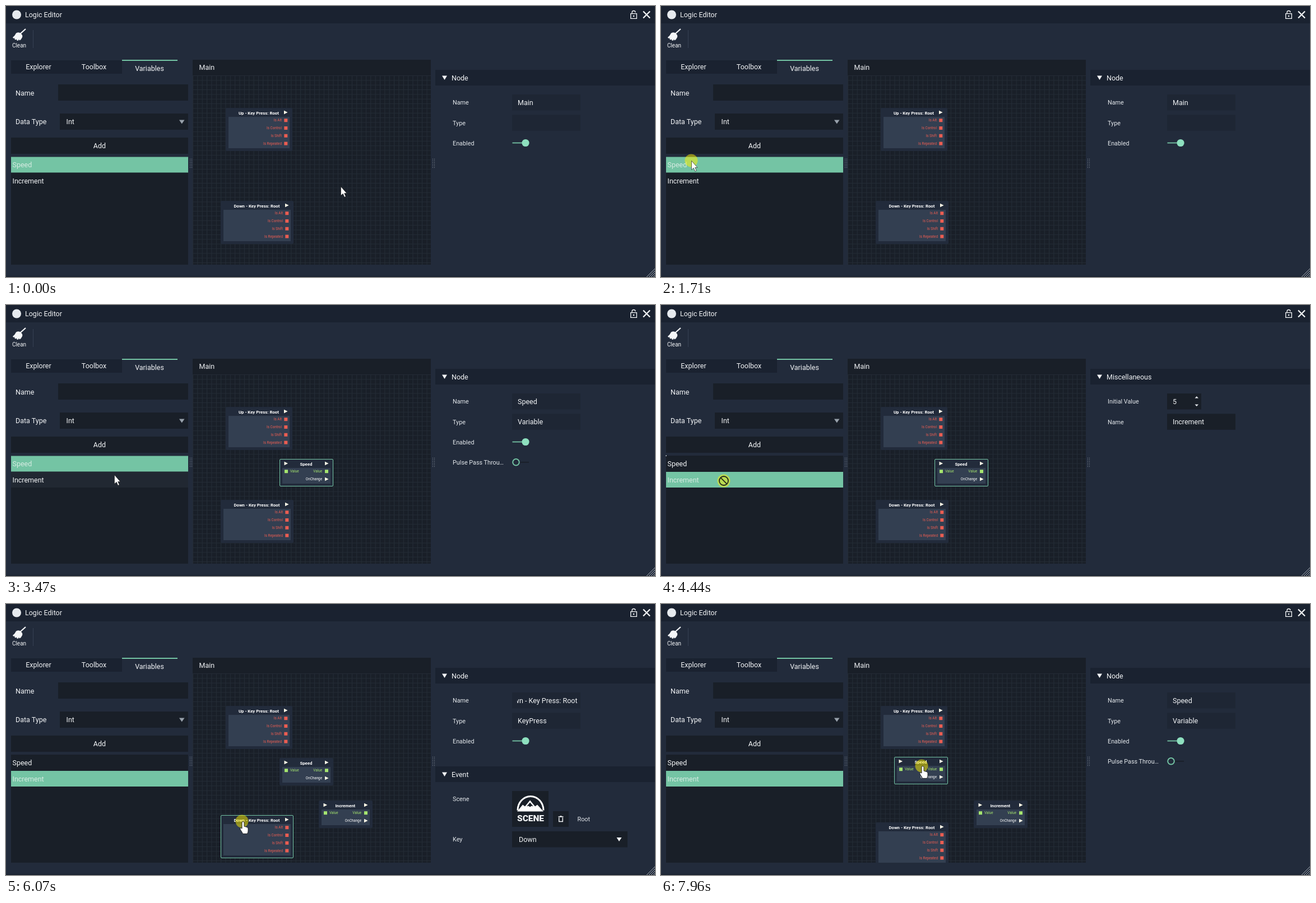
An HTML page that plays this animation: 1158 by 484 pixels, repeating every 8 s.

```html
<!DOCTYPE html>
<html lang="en">
<head>
<meta charset="utf-8">
<title>Logic Editor</title>
<style>
  html, body { margin: 0; width: 100%; height: 100%; overflow: hidden; background: #222b3b; }
  svg { display: block; width: 100vw; height: 100vh; }
  text { font: 12.5px Roboto, sans-serif; fill: #f2f4f6; white-space: pre; }
  .mid { text-anchor: middle; }
  .end { text-anchor: end; }
  .label { font-size: 10.8px; fill: #e4e8ec; }
  .small { font-size: 10px; }
  .title { font-size: 7.8px; font-weight: 700; text-anchor: middle; fill: #fff; }
  .pin { font-size: 6.3px; }
  .bar { fill: #1a2230; }
  .well { fill: #191f28; }
  .dim { fill: #1e2634; }
  .frame { fill: #222b3b; stroke: #222b3b; }
  .body { fill: #333f51; }
  .hover .frame { fill: #2a3549; stroke: #2a3549; }
  .hover .body { fill: #43506a; }
  .selected .frame { stroke: #74c4a4; }
  .row { fill: none; }
  .row.over { fill: #212832; }
  .row.on { fill: #74c4a4; }
  .row.on + text { fill: #d6ebe2; }
  .off { display: none; }
</style>
</head>
<body>
<svg viewBox="0 0 1158 484" preserveAspectRatio="none">
  <defs>
    <pattern id="grid" x="333" y="124" width="8.35" height="8.35" patternUnits="userSpaceOnUse">
      <path d="M0 .5H8.35M.5 0V8.35" stroke="#242c36" fill="none"/>
    </pattern>
    <clipPath id="canvasClip"><rect x="333" y="124" width="425" height="338"/></clipPath>
    <clipPath id="nameClip"><rect x="912" y="158" width="110" height="28"/></clipPath>
  </defs>
  <rect width="1158" height="484" fill="#222b3b"/>

  <!-- title bar and toolbar -->
  <rect class="bar" width="1158" height="31"/>
  <rect class="bar" y="482" width="1158" height="2"/>
  <circle cx="19" cy="15.5" r="8" fill="#e6eaee"/>
  <text x="34" y="20">Logic Editor</text>
  <g fill="none" stroke="#f4f6f8">
    <path d="M1114.7 13.7h10.600v8.600h-10.600zM1117 13.500v-2a3 3 0 0 1 6 0" stroke-width="1.3"/>
    <circle cx="1120" cy="18" r="1.3" fill="#f4f6f8" stroke="none"/>
    <path d="M1137 9.500l12 12m0-12l-12 12" stroke-width="2.2"/>
    <path d="M48.5 43v32" stroke="#364152"/>
    <path d="M35 41l-9.500 8.500" stroke-width="2.2"/>
  </g>
  <path d="M18 48.500q5-3 9 1t1 8q-1 3-4 4l-1-2-1.500 2.500-2.500-.8.5-2-2.500 1.300-2-1.800 1-1.500-2.800.5-1.200-1.700q4-3 6-7.500z" fill="#f4f6f8"/>
  <text class="small mid" x="23.5" y="73.5">Clean</text>

  <!-- variables panel -->
  <rect class="bar" x="9" y="97" width="198" height="24"/>
  <rect x="207" y="96" width="99" height="2" fill="#74c4a4"/>
  <text class="mid" x="58" y="113">Explorer</text>
  <text class="mid" x="157" y="113">Toolbox</text>
  <text class="mid" x="256" y="116">Variables</text>
  <text x="17" y="160">Name</text>
  <text x="17" y="211">Data Type</text>
  <rect class="well" x="93" y="140" width="232" height="29"/>
  <rect class="well" x="96" y="192" width="229" height="29"/>
  <text x="107.5" y="211">Int</text>
  <path d="M309 203.500h9.500l-4.750 7z" fill="#98a1ab"/>
  <rect class="well" x="9" y="235" width="316" height="29"/>
  <text class="mid" x="167" y="254">Add</text>
  <rect class="well" x="9" y="269" width="316" height="193"/>
  <rect class="row" id="rowSpeed" x="9" y="269.5" width="316" height="28"/>
  <text x="11.5" y="288">Speed</text>
  <rect class="row" id="rowIncrement" x="9" y="298" width="316" height="28"/>
  <text x="11.5" y="317">Increment</text>
  <rect id="dot" x="8.5" y="268.5" width="1.5" height="1.5" fill="#e8ecf0"/>
  <path d="M328.500 273v16M331.500 273v16M761.500 273v16M764.500 273v16" stroke="#8d95a1" stroke-dasharray="1 2"/>

  <!-- canvas -->
  <rect class="well" x="333" y="96" width="425" height="366"/>
  <rect x="333" y="124" width="425" height="338" fill="url(#grid)"/>
  <text x="344.5" y="114">Main</text>
  <g id="nodes" clip-path="url(#canvasClip)"></g>

  <g id="panels"></g>
  <path d="M1143 484l15-15M1147 484l11-11M1151 484l7-7M1155 484l3-3" stroke="#a9b0b9"/>

  <g id="pointer">
    <circle id="press" r="11.5" fill="#fff200" fill-opacity=".5"/>
    <path id="arrow" d="M.5 .5V16.500L4.200 13.300l2.600 6 2.500-1-2.600-5.800H11z" fill="#fff" stroke="#111" stroke-width=".6"/>
    <path id="hand" transform="translate(2 .5) scale(1 1.15)" d="M-2 2a2 2 0 0 1 4 0v5.500l5 1.300q2 .4 2 2.300v3.400q0 2-1.500 4.500h-8q-1-2.500-4-6q-1.500-2 0-3q1.200-.5 2.500 1z" fill="#fff" stroke="#111" stroke-width=".8"/>
    <path id="payload" d="M11 19.500h7v7h-4v-3h-3zM11 23.500v3h2" fill="#20262f" stroke="#f4f6f8" stroke-width="1.3"/>
    <g id="deny" fill="none" stroke="#26291a" stroke-width="1.8">
      <circle r="8"/><path d="M-5.600-5.600l11.200 11.200"/>
    </g>
  </g>
</svg>
<script>
const $ = id => document.getElementById(id);
const rect = (x, y, w, h, cls) => `<rect class="${cls}" x="${x}" y="${y}" width="${w}" height="${h}"/>`;
const text = (x, y, str, cls = '') => `<text class="${cls}" x="${x}" y="${y}">${str}</text>`;
const path = (d, fill) => `<path d="${d}" fill="${fill}"/>`;

// Graph nodes
const RED = '#ea5d52', GREEN = '#a5e56f';
const flow = (x, y) => path(`M${x - 3} ${y - 3.3}l6.600 3.300-6.600 3.300z`, '#fffbe8');
const socket = (x, y, color) => path(`M${x - 3} ${y - 3}h6v6h-6z`, color);
const pin = (x, y, str, color, cls = '') =>
  `<text class="pin ${cls}" x="${x}" y="${y + 2.2}" style="fill:${color}">${str}</text>`;

function box(w, h, title) {
  return `<rect class="frame" x=".5" y=".5" width="${w - 1}" height="${h - 1}" rx="1.5"/>` +
    rect(5, 16, w - 10, h - 21, 'body') +
    text(w / 2 - 0.6, 11.6, title, 'title') + flow(w - 12, 8);
}
function keyNode(w, title) {
  return box(w, 77, title) + ['Is Alt', 'Is Control', 'Is Shift', 'Is Repeated'].map((s, i) => {
    const y = 22.2 + i * 13.8;
    return pin(w - 19, y, s, RED, 'end') + socket(w - 11.7, y, RED);
  }).join('');
}
function varNode(title) {
  return box(96, 49, title) + flow(11.5, 8) +
    socket(12, 22.2, GREEN) + pin(19, 22.2, 'Value', GREEN) +
    pin(76, 22.2, 'Value', GREEN, 'end') + socket(84, 22.2, GREEN) +
    pin(76, 36, 'OnChange', '#fff', 'end') + flow(84, 36);
}
const nodes = {
  up: { x: 392, y: 182, w: 119, h: 77, art: keyNode(119, 'Up - Key Press: Root') },
  down: { x: 383, y: 348, w: 130, h: 77, art: keyNode(130, 'Down - Key Press: Root') },
  speed: { x: 488, y: 275, w: 96, h: 49, from: 2550, art: varNode('Speed') },
  increment: { x: 558, y: 351, w: 96, h: 49, from: 5050, art: varNode('Increment') }
};
$('nodes').innerHTML = Object.entries(nodes).map(([id, n]) => `<g id="${id}">${n.art}</g>`).join('');

// Property panels
const header = (y, str) => rect(766, y, 392, 28, 'bar') +
  path(`M778 ${y + 10.5}h9l-4.500 7.500z`, '#f4f6f8') + text(795, y + 19, str);
const label = (i, str) => text(797, 176.3 + i * 36.3, str, 'label');
const field = (i, str, cls, w = 122) =>
  rect(903, 158 + i * 36.3, w, 28.5, cls) + text(913, 176.8 + i * 36.3, str);
const enabled = label(2, 'Enabled') +
  '<path d="M903.500 244.500h20" stroke="#74c4a4" stroke-width="1.8"/><circle cx="927" cy="244.5" r="6.6" fill="#8ee0bf"/>';
const passThrough = label(3, 'Pulse Pass Throu…') +
  '<path d="M917 280.800h16" stroke="#191f28" stroke-width="1.8"/>' +
  '<circle cx="910" cy="280.8" r="5.8" fill="none" stroke="#74c4a4" stroke-width="2"/>';
const nodePanel = (name, type) => header(114, 'Node') +
  label(0, 'Name') + field(0, name, 'dim') + label(1, 'Type') + field(1, type, 'dim') + enabled;
const varPanel = name => nodePanel(name, 'Variable') + passThrough;
const miscPanel = (name, value) => header(114, 'Miscellaneous') +
  label(0, 'Initial Value') + field(0, value, 'well', 61) +
  path('M952.500 166.500h6.500l-3.250-3.500zM952.500 177.500h6.500l-3.250 3.500z', '#e4e8ec') +
  label(1, 'Name') + field(1, name, 'well');
const sceneThumb = rect(903, 334, 65, 64, 'well') +
  `<path d="M913 368.500a23 25 0 0 1 46 0" fill="none" stroke="#fff" stroke-width="3"/>
   <path d="M912 370.500l10-12 4 3 9-11 9 11 4-3 11 12z" fill="#fff"/>
   <path d="M929 361.500l6-7 6 7-3-1-3 2-3-2z" fill="#191f28"/>
   <text class="mid" x="936" y="388" style="font-size:15.5px;font-weight:900">SCENE</text>`;
const trash = rect(976, 370, 28, 28, 'well') +
  '<path d="M985.500 380h9M988.500 379h3M986.700 381.500v7h6.600v-7" fill="none" stroke="#f4f6f8" stroke-width="1.4"/>';
const keyPanel = nodePanel('', 'KeyPress') +
  `<g clip-path="url(#nameClip)">${text(1019.5, 176.8, 'Down - Key Press: Root', 'end')}</g>` +
  header(290, 'Event') + text(797, 352, 'Scene', 'label') + sceneThumb + trash +
  text(1019.5, 388, 'Root', 'label') + text(797, 424, 'Key', 'label') +
  rect(903, 406, 206, 28.5, 'well') + text(915, 425, 'Down') +
  path('M1089.500 417h9l-4.500 7z', '#f4f6f8');

const panels = {
  main: nodePanel('Main', ''),
  miscSpeed: miscPanel('Speed', 0),
  miscIncrement: miscPanel('Increment', 5),
  varSpeed: varPanel('Speed'),
  varIncrement: varPanel('Increment'),
  key: keyPanel
};
$('panels').innerHTML = Object.entries(panels).map(([id, art]) => `<g id="${id}">${art}</g>`).join('');

// Timeline
const LOOP = 8000;
const pointerPath = [
  [300, 597, 322], [500, 490, 326], [700, 265, 325], [890, 122, 294], [1070, 86, 280], [1120, 61, 266],
  [1400, 61, 266], [1480, 54, 276], [1760, 54, 276], [1950, 230, 279], [2120, 455, 282], [2220, 493, 282.5],
  [3060, 493, 282.5], [3200, 420, 288], [3450, 200, 303], [3700, 112, 306], [3850, 111, 313],
  [4440, 111, 314], [4600, 280, 332], [4780, 540, 370], [4870, 588, 376], [5000, 562, 359],
  [5100, 562, 359], [5300, 505, 388], [5440, 478, 397], [5520, 478, 397], [5840, 421, 359],
  [5890, 421, 359], [6150, 421, 401], [6400, 421, 401], [6610, 537, 292], [6900, 537, 292], [7040, 534.5, 292],
  [7100, 534.5, 292], [7550, 481, 291], [7700, 469, 290], [7960, 465, 289]
];
const downDrag = [[5890, 0, 0], [6150, 0, 42]];
const speedDrag = [[7100, 0, 0], [7550, -55, 0], [7700, -67, -1], [7960, -72, -2]];
const panelAt = [[0, 'main'], [1740, 'miscSpeed'], [2550, 'varSpeed'], [3980, 'miscIncrement'],
  [5050, 'varIncrement'], [5940, 'key'], [7100, 'varSpeed']];
const selectedAt = [[0, ''], [2550, 'speed'], [5050, 'increment'], [5890, 'down'], [6760, 'speed']];
const pressed = [[1680, 2550], [3900, 5050], [5890, 6180], [6760, LOOP]];
const carrying = [[1760, 2550], [4150, 5050]];

const during = (spans, t) => spans.some(([a, b]) => t >= a && t < b);
const latest = (steps, t) => steps.filter(s => s[0] <= t).pop()[1];
function along(pts, t) {
  const i = pts.findIndex(p => p[0] > t);
  if (i <= 0) return (i ? pts[pts.length - 1] : pts[0]).slice(1);
  const [a, b] = [pts[i - 1], pts[i]], k = (t - a[0]) / (b[0] - a[0]);
  return [a[1] + (b[1] - a[1]) * k, a[2] + (b[2] - a[2]) * k];
}
const show = (id, on) => $(id).classList.toggle('off', !on);
const move = (id, x, y) => $(id).setAttribute('transform', `translate(${Math.round(x)} ${Math.round(y)})`);

function draw(t) {
  const [px, py] = along(pointerPath, t);
  const press = during(pressed, t), carry = during(carrying, t);
  const panel = latest(panelAt, t), selected = latest(selectedAt, t);
  const shift = { down: along(downDrag, t), speed: along(speedDrag, t) };

  let overNode = false;
  for (const [id, n] of Object.entries(nodes)) {
    const [dx, dy] = shift[id] || [0, 0], x = n.x + dx, y = n.y + dy;
    const live = t >= (n.from || 0);
    const over = live && !carry && px >= x && px <= x + n.w && py >= y && py <= y + n.h;
    overNode = overNode || over;
    show(id, live);
    move(id, x, y);
    $(id).classList.toggle('hover', over && !press);
    $(id).classList.toggle('selected', id === selected);
  }
  for (const id in panels) show(id, id === panel);

  const second = t >= 3950;
  $('rowSpeed').classList.toggle('on', !second);
  $('rowIncrement').classList.toggle('on', second);
  $('rowIncrement').classList.toggle('over', !second && px < 325 && py > 298 && py < 326.5);
  show('dot', t >= 4230 && t < 5050);

  const denied = carry && px < 333;
  move('pointer', px, py);
  show('press', press);
  show('deny', denied);
  show('payload', carry && !denied);
  show('hand', overNode);
  show('arrow', !overNode && !denied);
}
function tick() {
  draw(performance.now() % LOOP);
  requestAnimationFrame(tick);
}
tick();
</script>
</body>
</html>
```
